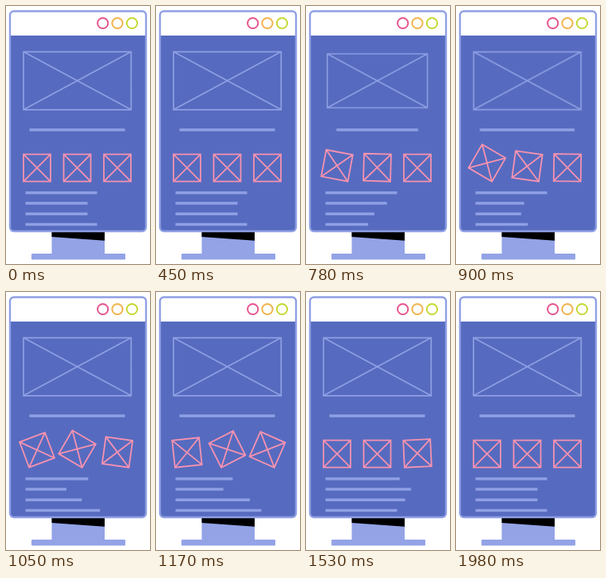
An HTML page for the animation above (2.13 s loop, 181 by 323 pixels).

```html
<!DOCTYPE html>
<html lang="en">
<head>
<meta charset="utf-8">
<title>Wireframe monitor</title>
<style>
@property --a {
  syntax: "<angle>";
  inherits: false;
  initial-value: 0deg;
}
html, body { margin: 0; width: 100%; height: 100%; overflow: hidden; background: #fff; }
svg { display: block; width: 100vw; height: 100vh; }

.hero, .title, .bar, .box {
  transform-box: fill-box;
  transform-origin: center;
  animation: 2130ms infinite;
}
.line { fill: #8f9fe4; }
.hero { fill: none; stroke: #8f9fe4; stroke-width: 1.7; }
.box { fill: none; stroke: #f792b0; stroke-width: 1.8; }

/* hero and title shrink and recover */
.hero, .title { animation-name: squeeze; animation-delay: 450ms; }
.hero { --s: .9; }
.title { --s: .795; }
@keyframes squeeze {
  0% { transform: scale(1); animation-timing-function: cubic-bezier(.455,.03,.515,.955); }
  11.268% { transform: scale(var(--s), var(--sy, var(--s))); animation-timing-function: cubic-bezier(.455,.03,.515,.955); }
  22.535%, 100% { transform: scale(1); }
}
.title { --sy: 1; }

/* boxes make a quarter turn while resting on the ground */
.box {
  animation-name: roll;
  animation-delay: calc(540ms + var(--i) * 150ms);
  transform: translateY(calc(17px * (1 - cos(var(--a)) - sin(var(--a))))) rotate(var(--a));
}
@keyframes roll {
  0% { --a: 0deg; animation-timing-function: cubic-bezier(.645,.045,.355,1); }
  39.437%, 100% { --a: 90deg; }
}

/* text bars: shorten, overshoot, settle */
.bar {
  transform-origin: left center;
  animation-name: stretch;
  animation-delay: calc(450ms + var(--i) * 150ms);
  animation-timing-function: cubic-bezier(.455,.03,.515,.955);
}
@keyframes stretch {
  0% { transform: scaleX(1); }
  12.676% { transform: scaleX(var(--lo)); }
  38.028% { transform: scaleX(var(--hi)); }
  50.704%, 100% { transform: scaleX(1); }
}
</style>
</head>
<body>
<svg viewBox="0 0 181 323" preserveAspectRatio="none">
  <defs>
    <clipPath id="screen"><rect x="5" y="6.5" width="171" height="275.5" rx="5"/></clipPath>
  </defs>

  <!-- stand -->
  <rect x="57.5" y="280" width="66.5" height="32" fill="#93a3e6"/>
  <path d="M57.5 280H124V293.8L57.5 289Z" fill="#000"/>
  <rect x="32" y="310" width="118" height="7.5" rx="1" fill="#93a3e6"/>

  <!-- screen -->
  <g clip-path="url(#screen)">
    <rect width="181" height="37" fill="#fff"/>
    <rect y="37" width="181" height="250" fill="#566bbf"/>
  </g>
  <rect x="5" y="6.5" width="171" height="275.5" rx="5" fill="none" stroke="#8f9fe4" stroke-width="2.4"/>
  <g fill="none" stroke-width="2">
    <circle cx="121.7" cy="21.5" r="6.6" stroke="#e5548f"/>
    <circle cx="140" cy="21.5" r="6.6" stroke="#f2b24a"/>
    <circle cx="158.4" cy="21.5" r="6.6" stroke="#c6d832"/>
  </g>

  <path class="hero" d="M22 57.3H157.3V129.8H22ZL157.3 129.8M157.3 57.3L22 129.8"/>
  <rect class="line title" x="29.5" y="153.3" width="120" height="3.5"/>

  <path class="box" style="--i:0" d="M22 185.7h34v34h-34zl34 34m0-34l-34 34"/>
  <path class="box" style="--i:1" d="M72.5 185.7h34v34h-34zl34 34m0-34l-34 34"/>
  <path class="box" style="--i:2" d="M123 185.7h34v34h-34zl34 34m0-34l-34 34"/>

  <g class="line">
    <rect class="bar" style="--i:3;--lo:.8;--hi:1.1" x="24.5" y="232.1" width="90" height="3.5"/>
    <rect class="bar" style="--i:2;--lo:.654;--hi:1.385" x="24.5" y="245.2" width="78" height="3.5"/>
    <rect class="bar" style="--i:1;--lo:.73;--hi:1.49" x="24.5" y="258.5" width="78" height="3.5"/>
    <rect class="bar" style="--i:0;--lo:.578;--hi:1.233" x="24.5" y="271.7" width="90" height="3.5"/>
  </g>
</svg>
</body>
</html>
```
